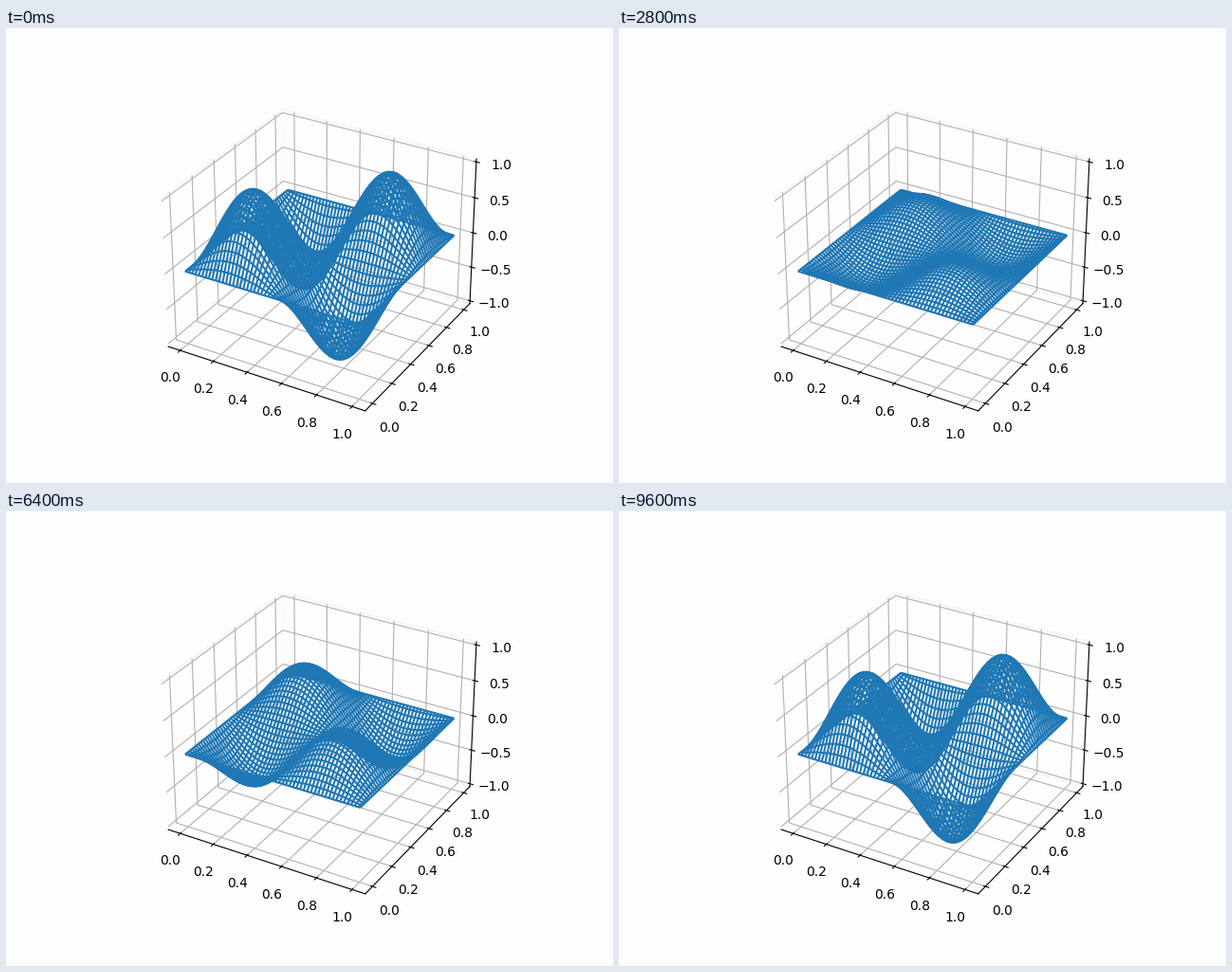
Animation, 640 px wide and 480 px high, one loop 9.8 s. Source, as a matplotlib script:

```python
import matplotlib.pyplot as plt
import numpy as np
from matplotlib.animation import FuncAnimation

FRAMES = 49
INTERVAL = 200
PERIOD = 50        # frames in one full oscillation
SAMPLES = 100      # surface points in each direction
PAPER = "#fdfdfd"

plt.rcParams["font.family"] = "DejaVu Sans"


def padded(low, high):
    """Limits widened by the usual 3D view margin."""
    pad = (high - low) / 48
    return low - pad, high + pad


def style_axes(ax):
    ax.set_facecolor(PAPER)
    ax.set_xlim(*padded(-0.05, 1.05))
    ax.set_ylim(*padded(-0.05, 1.05))
    ax.set_zlim(*padded(-1, 1))
    ax.set_xticks(np.linspace(0, 1, 6))
    ax.set_yticks(np.linspace(0, 1, 6))
    ax.set_zticks(np.linspace(-1, 1, 5))
    for axis in (ax.xaxis, ax.yaxis, ax.zaxis):
        axis.pane.set_facecolor(PAPER)
        axis.pane.set_edgecolor("#f4f4f4")
        axis.pane.set_alpha(1)


fig = plt.figure(figsize=(6.4, 4.8), dpi=100, facecolor=PAPER)
ax = fig.add_subplot(projection="3d")

side = np.linspace(0, 1, SAMPLES)
X, Y = np.meshgrid(side, side)
MODE = np.sin(2 * np.pi * X) * np.sin(2 * np.pi * Y)
mesh = None


def draw(frame):
    """Standing wave on a square membrane."""
    global mesh
    if mesh is not None:
        mesh.remove()
    height = np.cos(2 * np.pi * (frame + 1) / PERIOD)
    mesh = ax.plot_wireframe(X, Y, height * MODE, rstride=2, cstride=2,
                             color="#1f77b4", linewidth=1.5)
    style_axes(ax)
    return [mesh]


anim = FuncAnimation(fig, draw, frames=FRAMES, interval=INTERVAL,
                     repeat=True, repeat_delay=0, blit=False)
plt.show()
```
